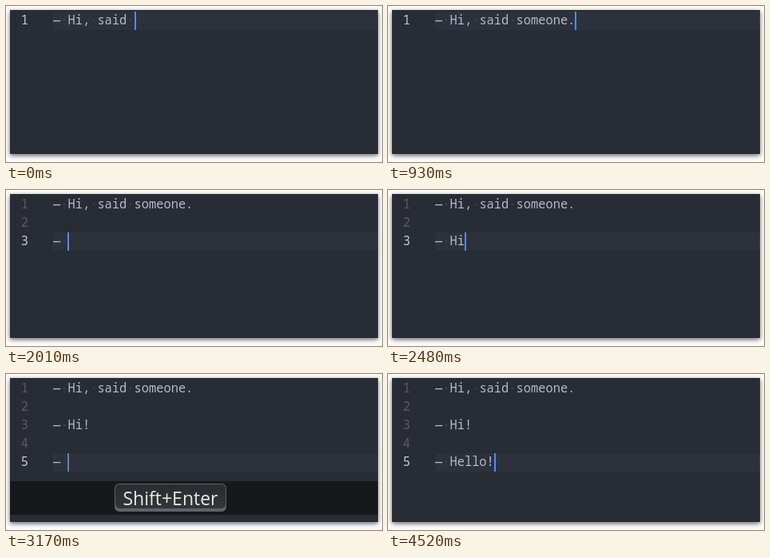
These frames come from a looping animation (471x195 px, 5280 ms). An HTML page:

```html
<!DOCTYPE html>
<html lang="en">
<head>
<meta charset="utf-8">
<title>Dialogue typing</title>
<style>
  html, body { margin: 0; width: 100%; height: 100%; overflow: hidden; background: #fff; }
  .window {
    position: absolute; left: 5px; top: 5px; width: 461px; height: 180px;
    background: #282c34; box-shadow: 0 2px 6px rgba(0, 0, 0, .6);
  }
  svg { position: absolute; left: 0; top: 0; display: block; }
  .code { font: 15.39px "Noto Sans Mono", "DejaVu Sans Mono", monospace; fill: #b4bac6; white-space: pre; }
  .space { fill: #474a52; }
  .number { fill: #5a5a68; text-anchor: end; }
  .number.active { fill: #c6cad2; }
  .key { font: 23px "Open Sans", "Noto Sans", sans-serif; fill: #e8e8e8; }
</style>
</head>
<body>
<div class="window"></div>
<svg width="471" height="195" viewBox="0 0 471 195">
  <defs>
    <linearGradient id="cap" x1="0" y1="0" x2="0" y2="1">
      <stop offset="0" stop-color="#2a2b2e"/>
      <stop offset="1" stop-color="#343538"/>
    </linearGradient>
  </defs>
  <rect id="highlight" x="59" width="407" height="23" fill="#2c313c"/>
  <g id="lines" class="code"></g>
  <rect id="cursor" width="2" height="23"/>
  <g id="overlay">
    <rect x="5" y="134" width="461" height="42" fill="#16181b"/>
    <rect x="136" y="137" width="140" height="35" rx="6" fill="#626366"/>
    <rect x="137" y="138" width="138" height="30" rx="5" fill="url(#cap)"/>
    <text class="key" x="146.5" y="164">Shift+Enter</text>
  </g>
</svg>
<script>
const LOOP = 5280;
const LEFT = 59, TOP = 7, LINE = 23, ADVANCE = 9.236;
const START = '— Hi, said ';
const NEXT = '\n\n— ';
const KEYS = [
  [70, 's'], [150, 'o'], [380, 'm'], [460, 'e'], [610, 'o'], [780, 'n'], [850, 'e'], [930, '.'],
  [1250, NEXT], [2180, 'H'], [2480, 'i'], [2860, '!'],
  [2940, NEXT], [3720, 'H'], [3800, 'e'], [4050, 'l'], [4200, 'l'], [4350, 'o'], [4520, '!']
];
const POPUPS = [[1250, 2010], [2940, 3640]];
const FADE_STEP = 76, FADE_COUNT = 4;

const byId = id => document.getElementById(id);
const highlight = byId('highlight'), lines = byId('lines');
const cursor = byId('cursor'), overlay = byId('overlay');
let shownText = null;

function textAt(t) {
  return START + KEYS.filter(([at]) => at <= t).map(([, s]) => s).join('');
}

function popupOpacity(t) {
  const popup = POPUPS.find(([from, to]) => t >= from && t < to);
  if (!popup) return 0;
  return Math.min(1, (Math.floor((t - popup[0]) / FADE_STEP) + 1) / FADE_COUNT);
}

function drawText(text) {
  const rows = text.split('\n');
  const last = rows.length - 1;
  const y = TOP + last * LINE;
  lines.innerHTML = rows.map((row, i) => {
    const base = TOP + i * LINE + 16;
    const body = row.replace(/ /g, '<tspan class="space">·</tspan>');
    return `<text class="number${i === last ? ' active' : ''}" x="28" y="${base}">${i + 1}</text>` +
      `<text x="${LEFT}" y="${base}">${body}</text>`;
  }).join('');
  highlight.setAttribute('y', y);
  cursor.setAttribute('y', y);
  cursor.setAttribute('x', Math.round(LEFT + rows[last].length * ADVANCE));
}

function render(t) {
  const text = textAt(t);
  if (text !== shownText) drawText(shownText = text);
  cursor.setAttribute('fill', t >= 2940 && t < 3720 ? '#5686bd' : '#528bff');
  overlay.setAttribute('opacity', popupOpacity(t));
}

const begin = performance.now();
function frame() {
  render((performance.now() - begin) % LOOP);
  requestAnimationFrame(frame);
}
render(0);
requestAnimationFrame(frame);
</script>
</body>
</html>
```
